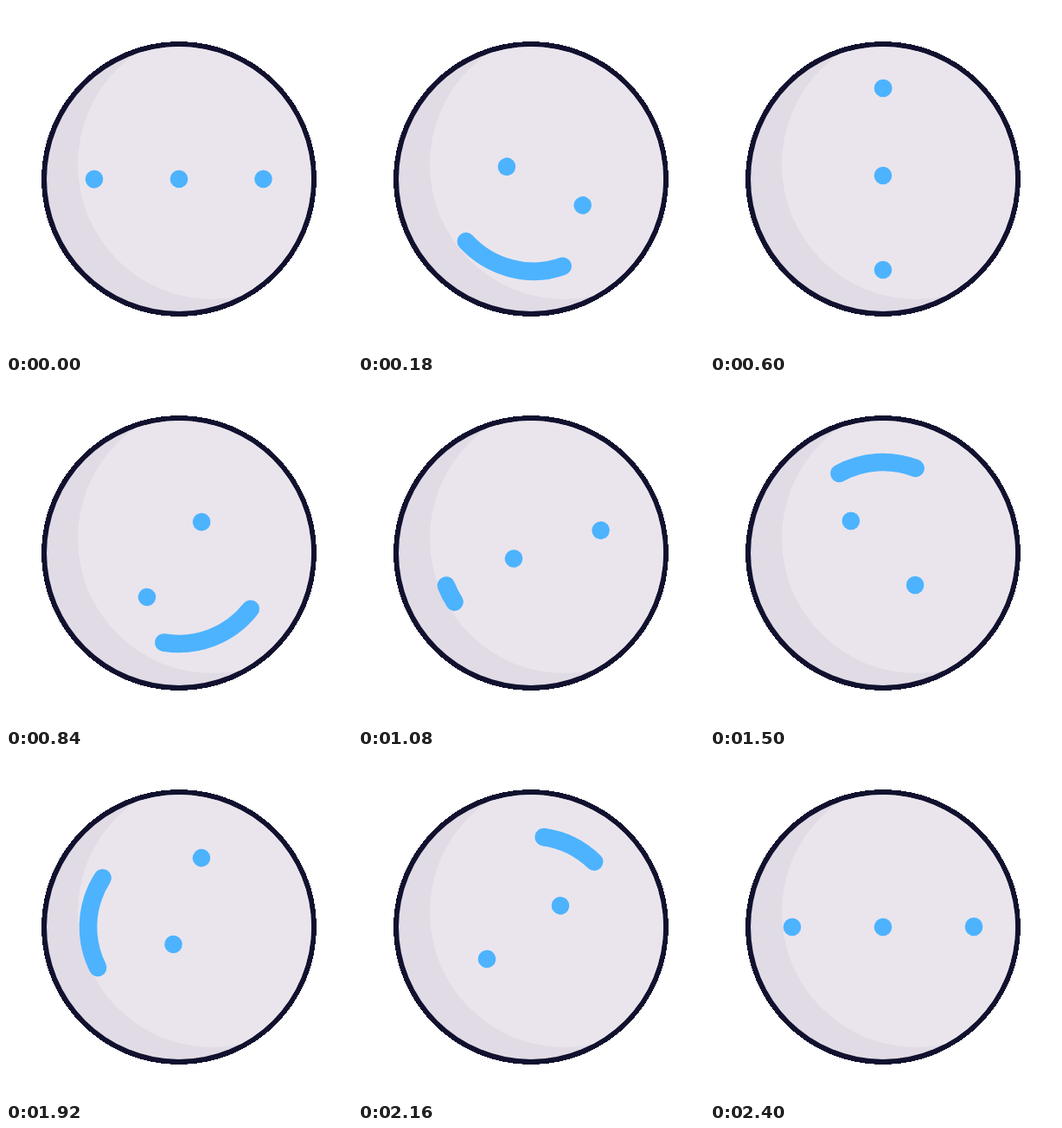
An HTML page that plays this animation: 400 px wide and 400 px high, repeating every 2.46 s.

```html
<!DOCTYPE html>
<html lang="en">
<head>
<meta charset="utf-8">
<title>Rolling face</title>
<style>
  html, body { margin: 0; width: 100%; height: 100%; overflow: hidden; background: #fff; }
  svg { display: block; width: 100vw; height: 100vh; }
</style>
</head>
<body>
<svg viewBox="0 0 400 400">
  <clipPath id="ball"><circle cx="200" cy="200" r="153"/></clipPath>
  <circle cx="200" cy="200" r="159" fill="#11112f" shape-rendering="crispEdges"/>
  <circle cx="200" cy="200" r="153" fill="#e1dbe5"/>
  <circle cx="239" cy="183" r="156" fill="#eae5ec" clip-path="url(#ball)"/>
  <g id="face" fill="#4db3ff">
    <circle id="eyeA" r="10.3"/>
    <circle id="eyeB" r="10.3"/>
    <path id="mouth" pathLength="1" fill="none" stroke="#4db3ff" stroke-width="20.6" stroke-linecap="round"/>
  </g>
</svg>
<script>
const LOOP = 2460, TURN = 600, STEP = 30, R = 105;
const [face, eyeA, eyeB, mouth] = ['face', 'eyeA', 'eyeB', 'mouth'].map(id => document.getElementById(id));

// Each quarter turn: travel of both eyes along the axis, and the mouth's path.
const over = `M${R} 0A${R} ${R} 0 0 0 ${-R} 0`;
const under = `M${R} 0A${R} ${R} 0 0 1 ${-R} 0`;
const turns = [
  { a: [-97.5, 4], b: [0, R], path: 'M98 0C98 -140 -104.5 -140 -104.5 0' },
  { a: [-R, 0], b: [4, R], path: under },
  { a: [-R, 0], b: [0, R], path: over },
  { a: [-R, 0], b: [0, R], path: under }
];

const mix = ([from, to], p) => from + (to - from) * p;

function bezier(x1, y1, x2, y2) {
  const at = (u, c1, c2) => 3 * (1 - u) * (1 - u) * u * c1 + 3 * (1 - u) * u * u * c2 + u * u * u;
  return x => {
    let lo = 0, hi = 1;
    for (let i = 0; i < 24; i++) {
      const mid = (lo + hi) / 2;
      if (at(mid, x1, x2) < x) lo = mid; else hi = mid;
    }
    return at(lo, y1, y2);
  };
}
const lead = bezier(.25, .73, .22, .96);
const trail = bezier(.333, .396, .667, .96);

function draw(ms) {
  const t = Math.min(Math.floor((ms % LOOP) / STEP) * STEP, 4 * TURN);
  const i = Math.min(Math.floor(t / TURN), 3);
  const p = t / TURN - i;
  const { a, b, path } = turns[i];
  const tail = Math.min(trail(p), .998);
  const len = Math.max(lead(p) - tail, .001);

  face.setAttribute('transform', `translate(200 200) rotate(${180 + t * 90 / TURN})`);
  eyeA.setAttribute('cx', mix(a, p));
  eyeB.setAttribute('cx', mix(b, p));
  mouth.setAttribute('d', path);
  mouth.setAttribute('stroke-dasharray', `${len} 2`);
  mouth.setAttribute('stroke-dashoffset', -tail);
}

const start = performance.now();
function tick() {
  draw(performance.now() - start);
  requestAnimationFrame(tick);
}
tick();
</script>
</body>
</html>
```
